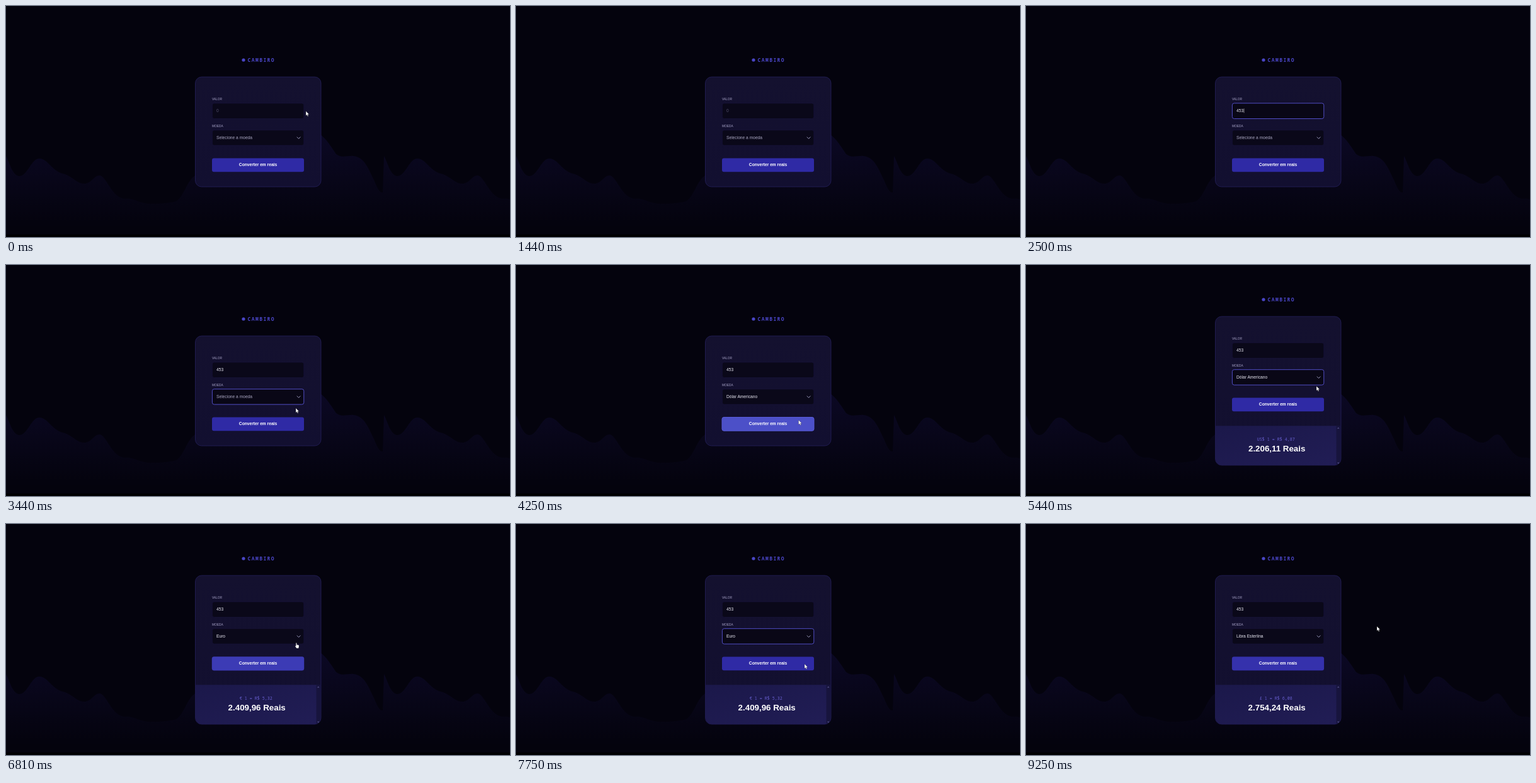
These frames come from a looping animation (800x368 px, 9310 ms). An HTML page:

```html
<!DOCTYPE html>
<html lang="pt-BR">
<head>
<meta charset="utf-8">
<style>
html, body { margin: 0; height: 100%; overflow: hidden; background: #04030d; }
svg { display: block; width: 100vw; height: 100vh; font: 6.67px "Liberation Sans", Arial, sans-serif; }
.label { font-size: 4.8px; fill: #aaa6ca; }
.bold { font-weight: bold; fill: #fff; text-anchor: middle; }
.field { fill: #0a0819; stroke: #17143a; stroke-width: .7; }
.focus { fill: #090716; stroke: #514dc4; stroke-width: 1; }
.mono { font-family: "Noto Sans Mono", "DejaVu Sans Mono", monospace; }
</style>
</head>
<body>
<svg viewBox="0 0 800 368" preserveAspectRatio="none">
  <defs>
    <linearGradient id="fade" gradientUnits="userSpaceOnUse" x1="0" y1="205" x2="0" y2="345">
      <stop offset="0" stop-color="#0b0824"/>
      <stop offset=".5" stop-color="#080619"/>
      <stop offset="1" stop-color="#04030e"/>
    </linearGradient>
    <linearGradient id="panel" x2="0" y2="1">
      <stop offset="0" stop-color="#14112f"/>
      <stop offset="1" stop-color="#120f30"/>
    </linearGradient>
    <linearGradient id="sum" x2="1" y2="1">
      <stop offset="0" stop-color="#1b184a"/>
      <stop offset="1" stop-color="#211d55"/>
    </linearGradient>
    <path id="hills" d="M0 239C6 250 10 270 21 271C34 271 40 243 53 243C66 243 72 262 90 267C106 271 112 283 124 283C136 283 140 269 149 270C160 272 168 305 188 307C202 305 212 315 230 315C248 315 258 314 270 311C284 303 288 272 305 268C370 256 440 235 480 205C497 192 512 218 524 236C533 243 542 238 552 239C570 241 576 262 584 277C590 291 592 297 598 297L600 239V350H0Z"/>
  </defs>
  <rect width="800" height="368" fill="#04030d"/>
  <g fill="url(#fade)"><use href="#hills"/><use href="#hills" x="600"/></g>
  <rect y="364" width="800" height="4" fill="#000002"/>

  <g id="page">
    <circle cx="377" cy="86" r="2.6" fill="#4a46c6"/>
    <text class="mono" x="383.6" y="88.8" font-size="8" font-weight="600" letter-spacing="1.4" fill="#4a46c6">CAMBIRO</text>
    <rect id="card" x="300.5" y="113" width="199.5" height="175" rx="10" fill="url(#panel)" stroke="#25205c" stroke-width=".8"/>

    <text class="label" x="327" y="149.6">VALOR</text>
    <rect id="amountBox" x="327.4" y="154.9" width="145.4" height="24.6" rx="3"/>
    <text id="amount" x="334" y="169.2"></text>
    <path id="caret" d="M346 163.3v7" stroke="#ddd" stroke-width=".6"/>

    <text class="label" x="327" y="192.5">MOEDA</text>
    <rect id="coinBox" x="327.4" y="197.7" width="145.4" height="24.4" rx="3"/>
    <text id="coin" x="334" y="212.2"></text>
    <path d="M461.8 208.6l2.8 2.8l2.8-2.8" fill="none" stroke="#aaa7cc" stroke-width=".9"/>

    <rect id="button" x="327" y="242.5" width="146" height="21.7" rx="3"/>
    <text class="bold" x="400" y="255.4">Converter em reais</text>

    <g id="result">
      <path d="M300.9 287.3H499.6V340a10 10 0 0 1-10 10H310.9a10 10 0 0 1-10-10Z" fill="url(#sum)"/>
      <path d="M492.6 287.3h7V340a10 10 0 0 1-7 9.5Z" fill="#17143d"/>
      <path d="M493.9 291.6l1.8-1.9l1.8 1.9ZM493.9 345.7l1.8 1.9l1.8-1.9Z" fill="#5c5890"/>
      <text id="rate" class="mono" x="396.7" y="311.2" text-anchor="middle" fill="#685fd0"></text>
      <text id="total" class="bold" x="398.2" y="327.6" font-size="13.33"></text>
    </g>
  </g>

  <g id="cursor">
    <path id="arrow" d="M0 0V7.2L1.7 5.7L2.8 8.2L4 7.7L2.9 5.2H5.1Z" fill="#fff" stroke="#111" stroke-width=".3"/>
    <path id="hand" d="M1.2 .7Q1.9-.4 2.6.7V3.3L5 3.7Q6.2 4 6.1 5.2L5.5 9H2.2L0 5.9Q-.4 4.8.6 5L1.2 5.6Z" fill="#fff" stroke="#111" stroke-width=".3"/>
  </g>
</svg>
<script>
const LOOP = 9310;
const $ = id => document.getElementById(id);
const clamp = v => Math.min(1, Math.max(0, v));
const within = (t, spans) => spans.some(([a, b]) => t >= a && t < b);
// last entry of a [time, value] list already reached
const latest = (t, list) => list.filter(e => e[0] <= t).pop();

// cursor stops: time, x, y, shape shown from then on
const stops = [
  [0, 476, 167.5, 'arrow'], [1060, 476, 167.5, 'arrow'], [1100, 472, 168, ''],
  [2650, 472, 172, ''], [2720, 470, 190, 'arrow'], [2800, 465, 207, 'hand'],
  [2960, 463, 210, 'arrow'], [3420, 460, 228, 'arrow'], [3560, 460, 228, 'arrow'],
  [3900, 449, 246, 'hand'], [4180, 448.5, 247, 'arrow'], [4700, 448.5, 247, 'arrow'],
  [5050, 461, 180, 'hand'], [5200, 461, 181, 'arrow'], [5440, 461, 193, 'arrow'],
  [5680, 460, 209, 'arrow'], [5850, 460, 209, 'arrow'], [6130, 459, 221, 'hand'],
  [6600, 459, 221, 'hand'], [6810, 459, 189, 'hand'], [7050, 461, 181, 'arrow'],
  [7200, 461, 183, 'arrow'], [7650, 458, 223, 'arrow'], [8200, 458, 223, 'arrow'],
  [8350, 457, 221, 'hand'], [8980, 457, 221, 'hand'], [9090, 490, 204, 'arrow'],
  [9230, 557, 163, 'arrow'], [LOOP, 557, 163, 'arrow']
];
const typed = [[0, ''], [1860, '4'], [2050, '45'], [2250, '453']];
const coins = [[0, 'Selecione a moeda'], [3500, 'Dólar Americano'], [5800, 'Euro'], [8120, 'Libra Esterlina']];
const quotes = [[4320, 'US$', 4.87], [6350, '€', 5.32], [8600, '£', 6.08]];
const hovers = [[3900, 4320], [6080, 6700], [8220, 9090]];
const selects = [[2960, 4180], [5200, 6300], [7050, 8560]];

const money = n => n.toFixed(2).replace('.', ',').replace(/(\d)(?=(\d{3})+,)/, '$1.');
const mix = (a, b, k) => `rgb(${a.map((v, i) => Math.round(v + (b[i] - v) * k))})`;

function moveCursor(t) {
  const i = stops.findIndex(s => s[0] > t);
  const [t0, x0, y0, shape] = stops[i - 1], [t1, x1, y1] = stops[i];
  const u = (t - t0) / (t1 - t0), k = u * u * (3 - 2 * u);
  $('cursor').setAttribute('transform', `translate(${x0 + (x1 - x0) * k} ${y0 + (y1 - y0) * k})`);
  for (const id of ['arrow', 'hand']) $(id).style.display = id === shape ? '' : 'none';
}

function draw(t) {
  const text = latest(t, typed)[1], coin = latest(t, coins), quote = latest(t, quotes);
  const editing = within(t, [[1470, 2960]]);
  const since = t - Math.max(1470, latest(t, typed)[0]);

  $('page').setAttribute('transform', `translate(0 ${quote ? -31 : 0})`);
  $('card').setAttribute('height', quote ? 237 : 175);
  $('result').style.display = quote ? '' : 'none';
  if (quote) {
    $('rate').textContent = `${quote[1]} 1 = R$ ${money(quote[2])}`;
    $('total').textContent = money(453 * quote[2]) + ' Reais';
  }

  $('amount').textContent = text || '0';
  $('amount').setAttribute('fill', text ? '#e8e7f2' : '#56536f');
  $('amountBox').setAttribute('class', editing ? 'focus' : 'field');
  $('caret').style.display = editing && since % 1000 < 500 ? '' : 'none';
  $('caret').setAttribute('transform', `translate(${(text.length - 3) * 3.71})`);

  $('coin').textContent = coin[1];
  $('coin').setAttribute('fill', coin[0] ? '#e8e7f2' : '#aaa7c2');
  $('coinBox').setAttribute('class', within(t, selects) ? 'focus' : 'field');

  const hover = Math.max(...hovers.map(([a, b]) => Math.min(clamp((t - a) / 200), 1 - clamp((t - b) / 200))));
  $('button').setAttribute('fill', mix([47, 42, 165], [76, 80, 200], hover));
  $('button').setAttribute('stroke', mix([47, 42, 165], [88, 90, 214], hover));
  $('button').setAttribute('stroke-width', hover);
  moveCursor(t);
}

function tick() {
  draw(performance.now() % LOOP);
  requestAnimationFrame(tick);
}
tick();
</script>
</body>
</html>
```
